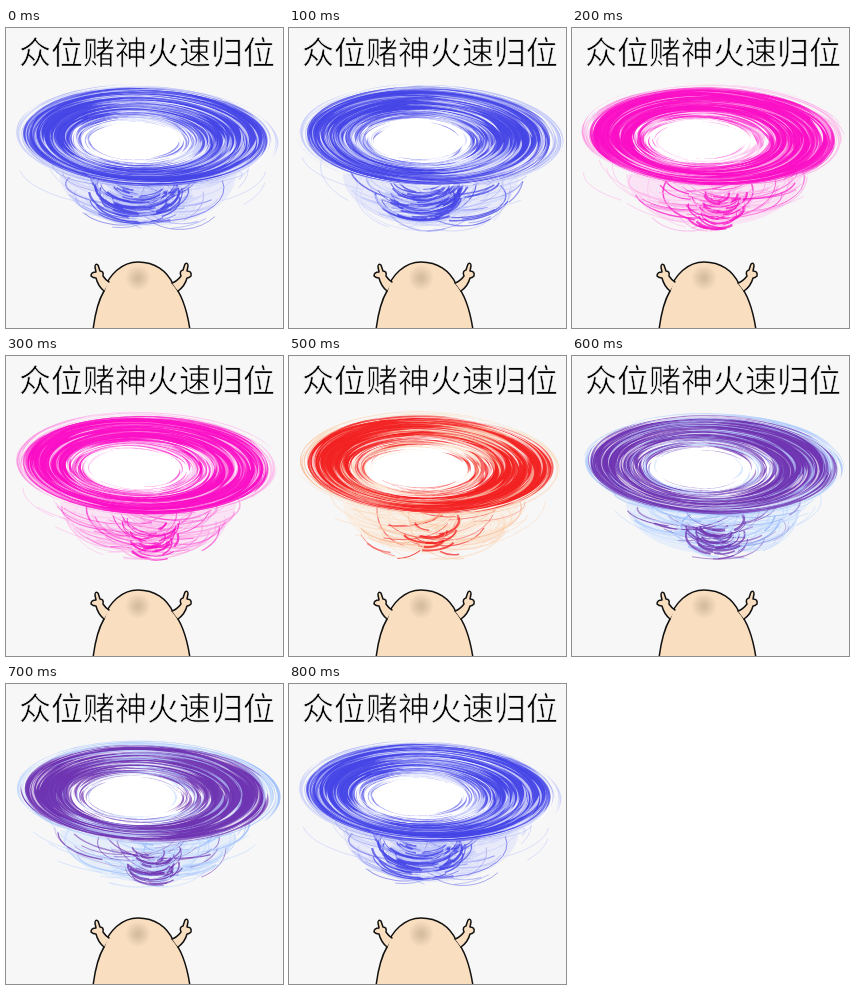
An HTML page with a canvas that plays this animation: 277x300 px, repeating every 900 ms.

```html
<!DOCTYPE html>
<html lang="zh-CN">
<head>
<meta charset="utf-8">
<style>
  html, body { margin: 0; width: 100%; height: 100%; overflow: hidden; background: #f7f7f7; }
  canvas { position: absolute; left: 0; top: 0; width: 277px; height: 300px; }
  h1 {
    position: absolute; left: 13px; top: 6px; margin: 0; white-space: nowrap; color: #000;
    font: 400 32px/32px "Noto Sans CJK SC", "Noto Sans CJK", sans-serif;
    -webkit-text-stroke: .7px #f7f7f7; /* thins the strokes */
  }
</style>
</head>
<body>
<canvas id="stage" width="277" height="300"></canvas>
<h1>众位赌神火速归位</h1>
<script>
const W = 277, H = 300, STEP = 100, TAU = Math.PI * 2;

// light: [angle, spread, strength] of sectors where the ring fades
// core: [x, y, rx, ry, strokes] of the dense tail of the funnel
const blue = { main: '#4646e6', pale: '#c3cafb', rim: '#979ff2', seed: 11,
  light: [[-1.5, .4, .5], [.5, .4, .8], [2.5, .4, .5]], core: [132, 162, 48, 26, 75] };
const pink = { main: '#fa10c6', pale: '#fdb4ea', rim: '#fb7fdc', seed: 23,
  light: [[2.1, .4, .3], [-.6, .5, .2]], core: [145, 178, 29, 18, 40] };
const red = { main: '#f32222', pale: '#fbdcc0', rim: '#f9bd98', seed: 37,
  light: [[-1.35, .5, .8], [2, .5, .5]], core: [133, 160, 44, 22, 45] };
const redOpen = { ...red, seed: 41,
  light: [[-1, .45, .95], [2.3, .5, .6]], core: [140, 177, 32, 17, 18] };
const violet = { main: '#6f35b2', pale: '#bcd6ff', rim: '#8fb4fb', seed: 59,
  light: [[-1.9, .5, .5], [1.5, .5, .4], [.1, .4, .3]], core: [146, 176, 33, 20, 45] };

// the same colours a little further round
const turned = (look, by) => ({
  ...look, seed: look.seed + 6, light: look.light.map(([a, ...rest]) => [a + by, ...rest])
});

const sequence = [
  blue, turned(blue, .4), pink, turned(pink, .4), red,
  redOpen, violet, turned(violet, .4), blue
];

function random(seed) {
  let s = seed * 7919;
  return () => {
    s = (s + 0x6d2b79f5) | 0;
    let x = Math.imul(s ^ (s >>> 15), 1 | s);
    x = (x + Math.imul(x ^ (x >>> 7), 61 | x)) ^ x;
    return ((x ^ (x >>> 14)) >>> 0) / 4294967296;
  };
}

// The disc widens from the bright eye (t = 0) to its rim (t = 1).
function onDisc(t, a) {
  const x = (45 + 77 * t) * Math.cos(a), y = (19 + 29.5 * t) * Math.sin(a);
  return [128 + 12 * t + x - y * .04, 113 - 4 * t + y + x * .035];
}

function swoosh(c, t, a, len, w, drift) {
  const n = 24;
  c.beginPath();
  for (let i = 0; i <= 2 * n; i++) {
    const back = i > n, u = (back ? 2 * n - i : i) / n;
    const off = w * Math.sin(Math.PI * u) * (back ? -1 : 1);
    c.lineTo(...onDisc(t + drift * u + off, a + len * u));
  }
  c.fill();
}

function disc(c, t) {
  c.moveTo(...onDisc(t, 0));
  for (let i = 1; i < 72; i++) c.lineTo(...onDisc(t, i / 72 * TAU));
  c.closePath();
}

function fade(light, a) {
  return light.reduce((sum, [angle, spread, strength]) => {
    const d = Math.atan2(Math.sin(a - angle), Math.cos(a - angle)) / spread;
    return sum + strength * Math.exp(-d * d);
  }, 0);
}

function arc(c, x, y, rx, ry, a, b) {
  c.beginPath();
  c.ellipse(x, y, rx, ry, .03, a, b);
  c.stroke();
}

function drawFunnel(c, look, rnd) {
  const between = (a, b) => a + (b - a) * rnd();
  const { main, pale, rim } = look;

  c.globalAlpha = .3;
  c.fillStyle = pale;
  c.beginPath();
  c.ellipse(142, 146, 88, 52, 0, 0, Math.PI);
  c.fill();

  // hanging loops, kept inside a bowl
  for (let i = 0; i < 95; i++) {
    const x = between(105, 180), y = between(134, 172), a = between(-.5, 2);
    const rx = Math.min(between(25, 95), 104 - Math.abs(x - 142) - (y - 134) * .9);
    const ry = Math.min(between(14, 40), 203 - y);
    c.strokeStyle = [main, rim, pale, pale][Math.floor(rnd() * 4)];
    c.globalAlpha = between(.4, .8);
    c.lineWidth = between(.5, 1.6);
    arc(c, x, y, rx, ry, a, a + between(.6, 1.9));
  }
  // loose outer wisps
  for (let i = 0; i < 10; i++) {
    const a = between(-.2, 2.4);
    c.strokeStyle = pale;
    c.globalAlpha = .7;
    c.lineWidth = .8;
    arc(c, 138, between(128, 150), between(90, 128), between(36, 52), a, a + between(.4, 1));
  }
  const [x, y, rx, ry, count] = look.core;
  for (let i = 0; i < count; i++) {
    const k = between(.45, 1), a = between(-.4, 1.9);
    c.strokeStyle = rnd() < .75 ? main : pale;
    c.globalAlpha = .75;
    c.lineWidth = between(.6, 2.4);
    arc(c, x + between(-5, 5), y + between(-14, 9), rx * k, ry * k, a, a + between(.7, 1.8));
  }
  c.globalAlpha = 1;
}

function drawDisc(c, look, rnd) {
  const between = (a, b) => a + (b - a) * rnd();
  const { main, pale, rim, light } = look;
  const streaks = (n, t0, t1, w, alpha, color) => {
    for (let i = 0; i < n; i++) {
      const t = between(t0, t1), len = between(.5, 1.6), a = rnd() * TAU;
      c.fillStyle = color(t, a);
      c.globalAlpha = alpha;
      swoosh(c, t, a - len / 2, len, between(.25, 1) * w, between(-.07, .07));
    }
  };
  const bright = () => rnd() < .4 ? '#fff' : pale;

  c.fillStyle = '#fff';
  c.beginPath();
  disc(c, .97);
  c.fill();

  streaks(70, .94, 1.11, .016, .65, () => rnd() < .35 ? rim : pale);
  c.globalAlpha = .95;
  c.fillStyle = main;
  c.beginPath();
  disc(c, .95);
  disc(c, .36);
  c.fill('evenodd');

  streaks(620, .12, 1, .024, .65, (t, a) => {
    const pales = .1 + fade(light, a) + Math.max(0, .4 - t) * 1.3;
    return rnd() < pales ? bright() : main;
  });
  streaks(45, -.02, .2, .014, .55, () => rnd() < .3 ? main : bright());
  c.globalAlpha = 1;
}

function drawFigure(c) {
  c.lineJoin = c.lineCap = 'round';
  c.strokeStyle = '#111';
  c.lineWidth = 1.5;
  const shape = (d, fill) => {
    const p = new Path2D(d);
    c.fillStyle = fill;
    c.fill(p);
    c.stroke(p);
  };
  const skin = '#f9dfc0';
  shape('M87 302C89 286 92 273 98 263C102 247 116 234 132 234C149 234 161 243 167 256C175 265 181 282 184 302Z', skin);
  shape('M103 254C101 253 99 251 97 248Q98 243 94 243L92 237Q89 235 89 239L90 244Q85 244 85 248Q87 250 90 250Q92 258 98 263', skin);
  shape('M166 255C169 254 172 252 175 248Q173 243 177 242L179 236Q182 234 182 238L181 243Q186 243 185 248Q183 250 181 250Q179 258 172 263', skin);

  // soft shade in place of a face
  c.save();
  c.translate(132, 250);
  const g = c.createRadialGradient(0, 0, 2, 0, 0, 13);
  g.addColorStop(0, 'rgba(150,126,100,.35)');
  g.addColorStop(1, 'rgba(150,126,100,0)');
  c.fillStyle = g;
  c.fillRect(-13, -13, 26, 26);
  c.restore();
}

function render(look) {
  const canvas = document.createElement('canvas');
  canvas.width = W;
  canvas.height = H;
  const c = canvas.getContext('2d');
  c.fillStyle = '#f7f7f7';
  c.fillRect(0, 0, W, H);
  const rnd = random(look.seed);
  drawFunnel(c, look, rnd);
  drawDisc(c, look, rnd);
  drawFigure(c);
  return canvas;
}

const poses = sequence.map(render);
const stage = document.getElementById('stage').getContext('2d');
const start = performance.now();

function tick() {
  const time = Math.max(0, performance.now() - start);
  stage.drawImage(poses[Math.floor(time / STEP) % poses.length], 0, 0);
  requestAnimationFrame(tick);
}
tick();
</script>
</body>
</html>
```
